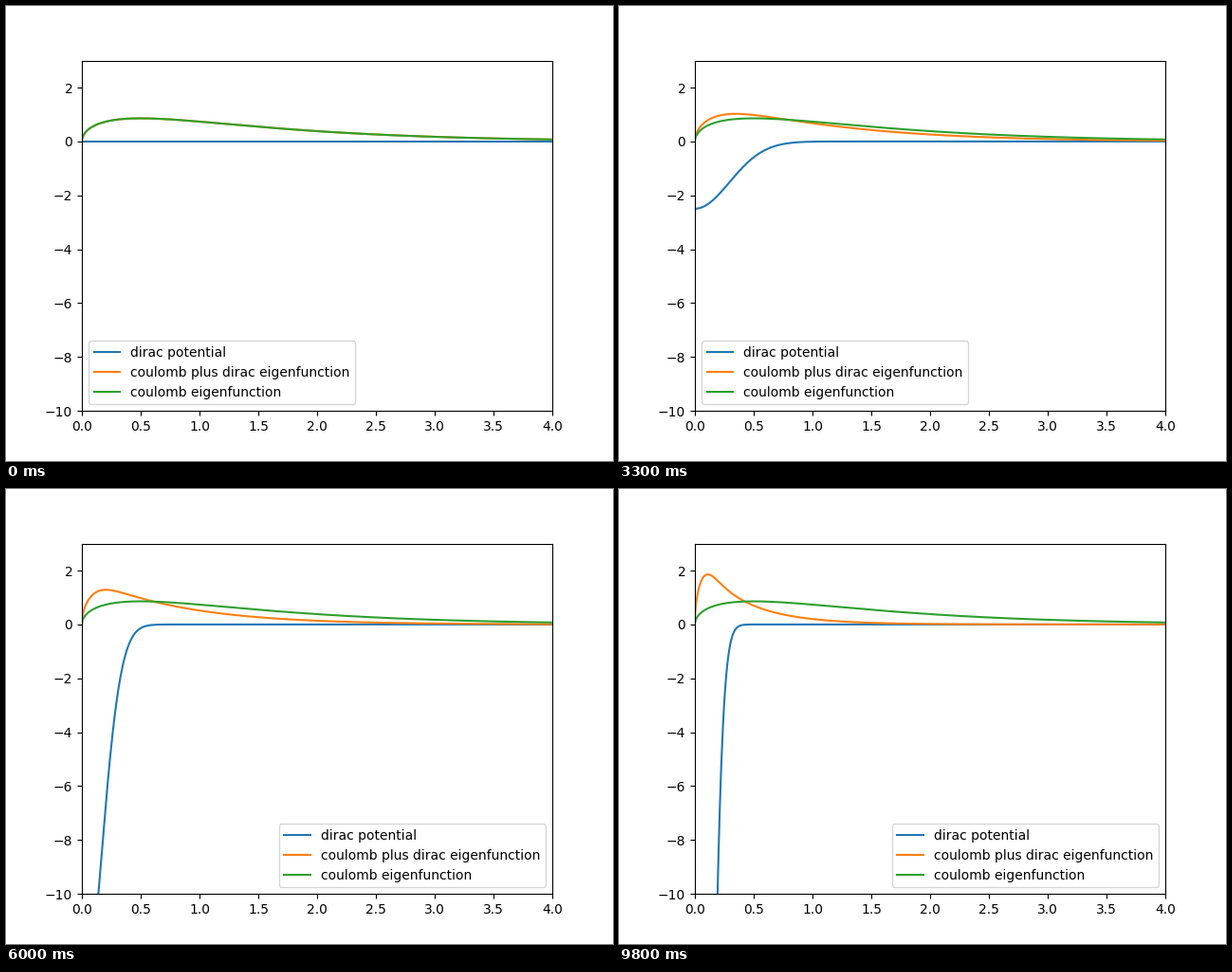
A matplotlib script for the animation above (9.9 s loop, 640 by 480 pixels).

```python
import numpy as np
import matplotlib.pyplot as plt
from matplotlib.animation import FuncAnimation

FRAMES = 99
INTERVAL = 100

# Logarithmic radial mesh; y = sqrt(r) * R(r) obeys a regular equation on it
N = 420
x, dx = np.linspace(np.log(1e-4), np.log(20), N, retstep=True)
r = np.exp(x)
kinetic = (np.diag(np.full(N, 1 / dx**2 + 1 / 8))
           - np.diag(np.full(N - 1, 0.5 / dx**2), 1)
           - np.diag(np.full(N - 1, 0.5 / dx**2), -1))


def smeared_delta(k):
    """Attractive normalised 3D Gaussian of width 1 / k."""
    return -(k / np.sqrt(2 * np.pi))**3 * np.exp(-(k * r)**2 / 2)


def ground_state(potential, y):
    """Rayleigh quotient iteration, started from a nearby state y."""
    h = kinetic + np.diag(r**2 * potential)
    weight = r**2
    for _ in range(4):
        energy = y @ h @ y / (y @ (weight * y))
        y = np.linalg.solve(h - np.diag(energy * weight), weight * y)
        y /= np.sqrt(np.sum(y**2 * r) * dx)
    return y * np.sign(y.sum())


coulomb = 2 * np.sqrt(r) * np.exp(-r)
states = []
state = coulomb
for i in range(FRAMES):
    delta = smeared_delta((i + 1) / 10)
    state = ground_state(delta - 1 / r, state)
    states.append((delta, state))

fig, ax = plt.subplots(figsize=(6.4, 4.8), dpi=100)
ax.set_xlim(0, 4)
ax.set_ylim(-10, 3)
delta_line, = ax.plot(r, states[0][0], label="dirac potential")
state_line, = ax.plot(r, states[0][1], label="coulomb plus dirac eigenfunction")
ax.plot(r, coulomb, label="coulomb eigenfunction")
ax.legend(loc="best")


def update(i):
    delta, y = states[i]
    delta_line.set_ydata(delta)
    state_line.set_ydata(y)
    return delta_line, state_line


anim = FuncAnimation(fig, update, frames=FRAMES, interval=INTERVAL,
                     repeat=True, repeat_delay=0, blit=False)
plt.show()
```
